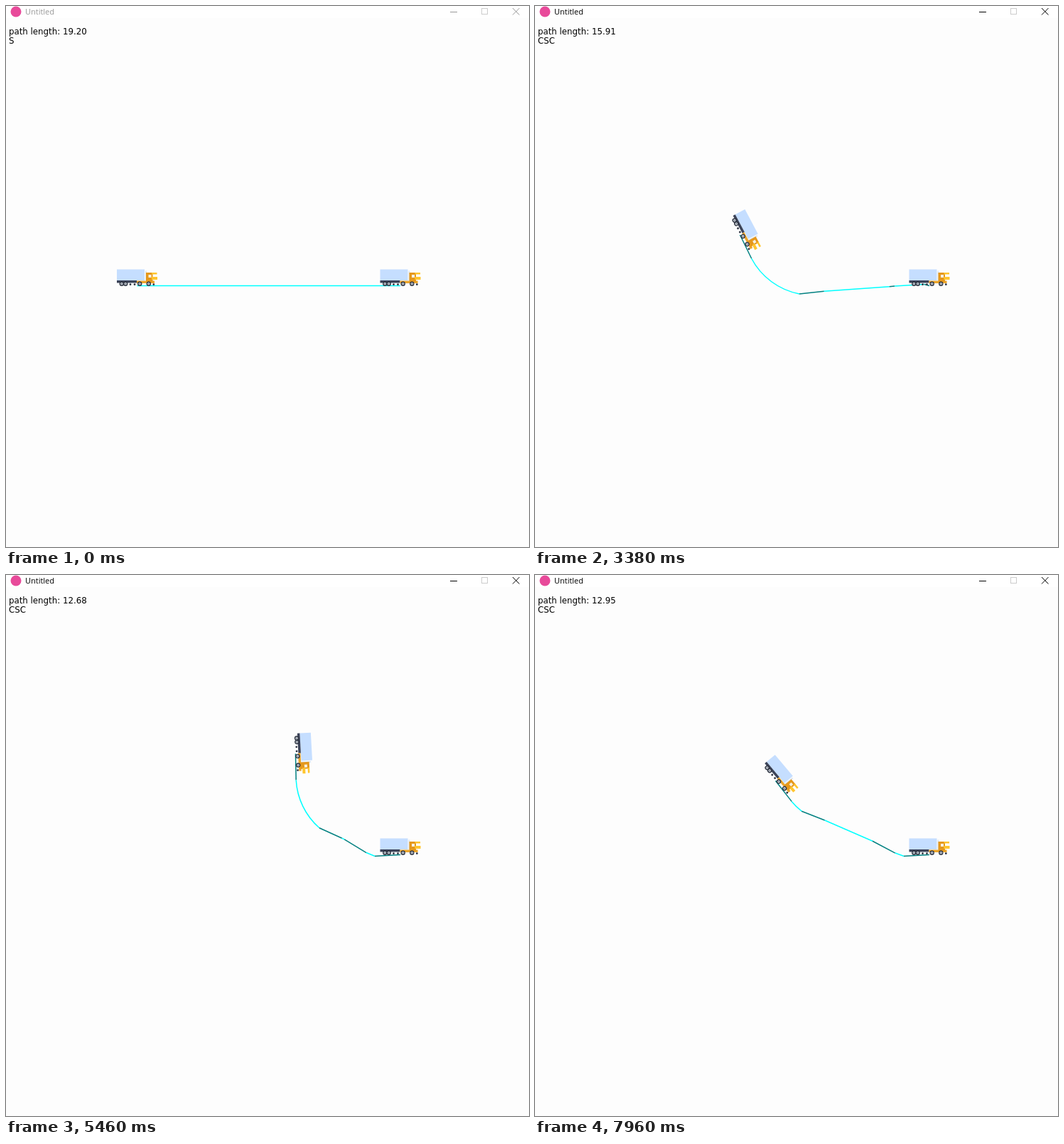
Write an HTML page with a canvas that moves like this. It is 736 px wide and 761 px high and loops after 8 s.

```html
<!DOCTYPE html>
<html lang="en">
<head>
<meta charset="utf-8">
<title>Untitled</title>
<style>
  html, body { margin: 0; width: 100%; height: 100%; overflow: hidden; background: #fdfdfd; }
  canvas { display: block; }
</style>
</head>
<body>
<canvas id="stage" width="736" height="761"></canvas>
<script>
const ctx = document.getElementById('stage').getContext('2d');
const LOOP = 8000, DEG = Math.PI / 180;
const CYAN = '#00ffff', TEAL = '#008080', RED = '#ff0000';
const GOAL = [555, 393.5];
const RADIUS = 97, EASE = 36;            // turning circle, length of a transition
const WIDE = 123.5, HUB = [552, 276.5];  // single wide turn into the goal

// Dragged poses: position, heading in degrees, shown path length
const POSES = [
  { step: -1, x: 184.5, y: 393.5, turn: 0, len: 19.20 },
  { step: 11, x: 235, y: 358, turn: 21.5, len: 16.84 },
  { step: 23, x: 288.5, y: 322, turn: 62, len: 15.91 },
  { step: 29, x: 315, y: 323, turn: 67, len: 15.12 },
  { step: 43, x: 378, y: 275, turn: 82.4, len: 13.11 },
  { step: 55, x: 428.5, y: 234.5, turn: 90, len: 12.38 },
  { step: 66, x: 379, y: 245, turn: 83.5, len: 13.59 },
  { step: 76, x: 338.5, y: 289.5, turn: 50, len: 12.95 }
];

// The drag advances in short steps with one pause
function stepAt(t) {
  if (t < 1600) return -1;
  if (t < 6320) return Math.min(55, Math.floor((t - 1575) / 77.45));
  return Math.min(76, 55 + Math.floor((t - 6300) / 78.1));
}

function poseAt(step) {
  const i = Math.max(1, POSES.findIndex(p => p.step >= step));
  const a = POSES[i - 1], b = POSES[i];
  const k = (step - a.step) / (b.step - a.step);
  const mix = name => a[name] + (b[name] - a[name]) * k;
  return { at: [mix('x'), mix('y')], turn: mix('turn'), len: mix('len') };
}

// Point at a distance along a heading in degrees
const go = ([x, y], deg, d) => [x + d * Math.cos(deg * DEG), y + d * Math.sin(deg * DEG)];

// Joints of turn, straight, turn, where the straight has heading phi
function joints(at, turn, phi) {
  const exit = Math.min(turn, phi + 15);
  const turnIn = go(at, turn + 2, EASE + 1);
  const turnOut = go(go(turnIn, turn - 90, RADIUS), exit + 90, RADIUS);
  const straightIn = go(turnOut, phi - 2, EASE - 1);

  const ease = EASE * Math.min(1, Math.abs(phi) / 20);
  const lastOut = [GOAL[0] - ease, GOAL[1] + 2 * Math.sign(phi)];
  const lastIn = go(lastOut, phi * 0.85, ease - EASE - 13);
  const straightOut = go(lastIn, phi * 1.18, -ease);
  return [at, turnIn, turnOut, straightIn, straightOut, lastIn, lastOut, GOAL];
}

// Bisect for the heading at which the straight meets the last turn
function findPath({ at, turn }) {
  let low = -30, high = 80;
  for (let i = 0; i < 30; i++) {
    const phi = (low + high) / 2;
    const [, , , a, b] = joints(at, turn, phi);
    const side = Math.cos(phi * DEG) * (b[1] - a[1]) - Math.sin(phi * DEG) * (b[0] - a[0]);
    if (side > 0) low = phi; else high = phi;
  }
  return joints(at, turn, low);
}

function stroke(color, from, to, radius) {
  const link = radius ? `A${radius} ${radius} 0 0 0 ` : 'L';
  ctx.strokeStyle = color;
  ctx.lineWidth = 1.5;
  ctx.stroke(new Path2D(`M${from}${link}${to}`));
}

function rect(color, x, y, w, h) {
  ctx.fillStyle = color;
  ctx.fillRect(x, y, w, h);
}

function disc(color, x, y, r) {
  ctx.fillStyle = color;
  ctx.beginPath();
  ctx.arc(x, y, r, 0, 7);
  ctx.fill();
}

function text(str, x, y, font, color) {
  ctx.font = font;
  ctx.fillStyle = color;
  ctx.fillText(str, x, y);
}

function truck([x, y], turn) {
  ctx.save();
  ctx.translate(x, y);
  ctx.rotate(turn * DEG);
  rect('#c5deff', -28.5, -23, 39, 15.5);
  rect('#3b4358', -28.5, -7.5, 28, 3.5);
  rect('#eba52c', -0.5, -7, 25, 3.5);
  rect('#dde6ef', 11.5, -21, 2, 14);
  rect('#e5981c', 12.5, -18.5, 9.5, 13);
  rect('#f6f0e0', 16, -15.5, 4, 4);
  rect('#ffc52e', 20.5, -18.5, 7.5, 2.5);
  rect('#ffc52e', 20.5, -12.5, 8, 4);
  for (const wx of [-21.7, -16.3, 3.7, 16.3]) {
    disc('#2d3340', wx, -2.8, 3.2);
    disc('#dde3ea', wx, -2.8, 1.8);
    disc('#2d3340', wx, -2.8, 0.7);
  }
  for (const wx of [-9.5, -3.5, 23.3]) disc('#2d3340', wx, -1.8, 1.4);
  ctx.restore();
}

function titleBar(active) {
  const ink = active ? '#000' : '#999';
  rect('#fff', 0, 0, 736, 17);
  disc('#e84a9a', 14, 8, 7.5);
  text('Untitled', 27, 12, '11px "Open Sans", sans-serif', ink);
  rect(ink, 625, 8, 10, 1);
  ctx.lineWidth = 1;
  ctx.strokeStyle = '#ccc';
  ctx.strokeRect(669.5, 3.5, 8, 8);
  ctx.strokeStyle = ink;
  ctx.stroke(new Path2D('M713 3L722.5 12.5M722.5 3L713 12.5'));
}

function drawWideTurn(at, turn) {
  const easeIn = go(at, turn, 12.5);
  const turnIn = go(HUB, 180, WIDE), turnOut = go(HUB, 103, WIDE);
  stroke(CYAN, at, easeIn);
  stroke(TEAL, easeIn, turnIn);
  stroke(RED, turnIn, turnOut, WIDE);
  stroke(TEAL, turnOut, GOAL);
  disc(RED, ...HUB, 3);
}

function drawTwoTurns(pose) {
  const p = findPath(pose);
  for (let i = 0; i < 7; i++) {
    stroke(i % 2 ? CYAN : TEAL, p[i], p[i + 1], i === 1 && RADIUS);
  }
}

function draw(t) {
  const pose = poseAt(stepAt(t));
  const label = pose.turn === 0 ? 'S' : pose.turn > 89 ? 'SC' : 'CSC';

  rect('#fdfdfd', 0, 0, 736, 761);
  titleBar(t >= 500);

  if (label === 'S') stroke(CYAN, pose.at, GOAL);
  else if (label === 'SC') drawWideTurn(pose.at, pose.turn);
  else drawTwoTurns(pose);

  truck(pose.at, pose.turn);
  truck(GOAL, 0);

  const font = '11.8px "DejaVu Sans", sans-serif';
  text('path length: ' + pose.len.toFixed(2), 4, 40, font, '#000');
  text(label, 4, 53, font, '#000');
}

const start = performance.now();
function tick() {
  draw((performance.now() - start) % LOOP);
  requestAnimationFrame(tick);
}
tick();
</script>
</body>
</html>
```
